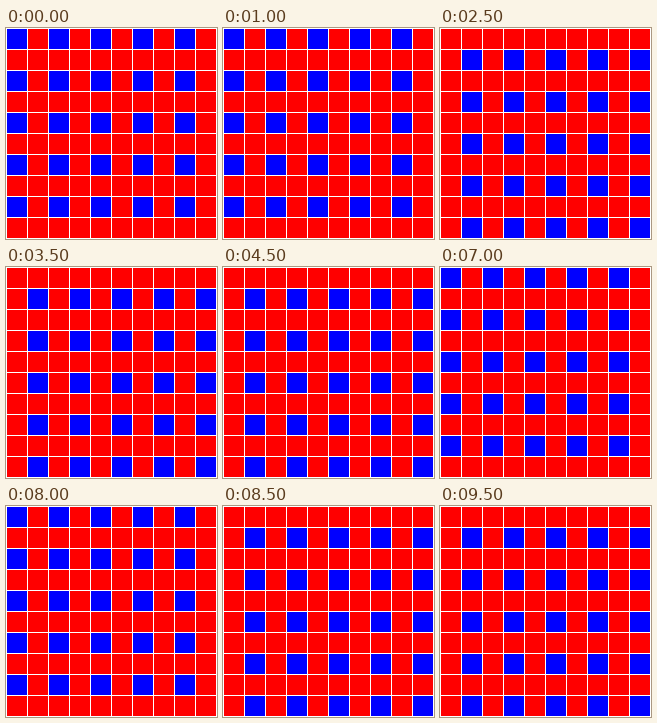
Animation of 211x211 px, one loop 10 s. Source, as an HTML page:

```html
<!DOCTYPE html>
<html lang="en">
<head>
<meta charset="utf-8">
<title>Alternating grid</title>
<style>
  html, body { margin: 0; width: 100%; height: 100%; overflow: hidden; background: #fff; }
  svg { display: block; width: 211px; height: 211px; }
</style>
</head>
<body>
<svg id="stage" viewBox="0 0 211 211" shape-rendering="crispEdges"></svg>
<script>
const COUNT = 10, PITCH = 21, STEP = 500, LOOP = 10000;
const RED = '#ff0000', BLUE = '#0000ff';
const stage = document.getElementById('stage');
const cells = [];

for (let row = 0; row < COUNT; row++) {
  for (let col = 0; col < COUNT; col++) {
    const rect = document.createElementNS('http://www.w3.org/2000/svg', 'rect');
    rect.setAttribute('x', col * PITCH + 1);
    rect.setAttribute('y', row * PITCH + 1);
    rect.setAttribute('width', PITCH - 1);
    rect.setAttribute('height', PITCH - 1);
    stage.appendChild(rect);
    cells.push({ rect, row, col });
  }
}

// Blue sits where row and column both share the parity of the step.
function draw(time) {
  const parity = Math.floor((time % LOOP) / STEP) % 2;
  for (const { rect, row, col } of cells) {
    const blue = row % 2 === parity && col % 2 === parity;
    rect.setAttribute('fill', blue ? BLUE : RED);
  }
}

const start = performance.now();
function tick() {
  draw(performance.now() - start);
  requestAnimationFrame(tick);
}
tick();
</script>
</body>
</html>
```
